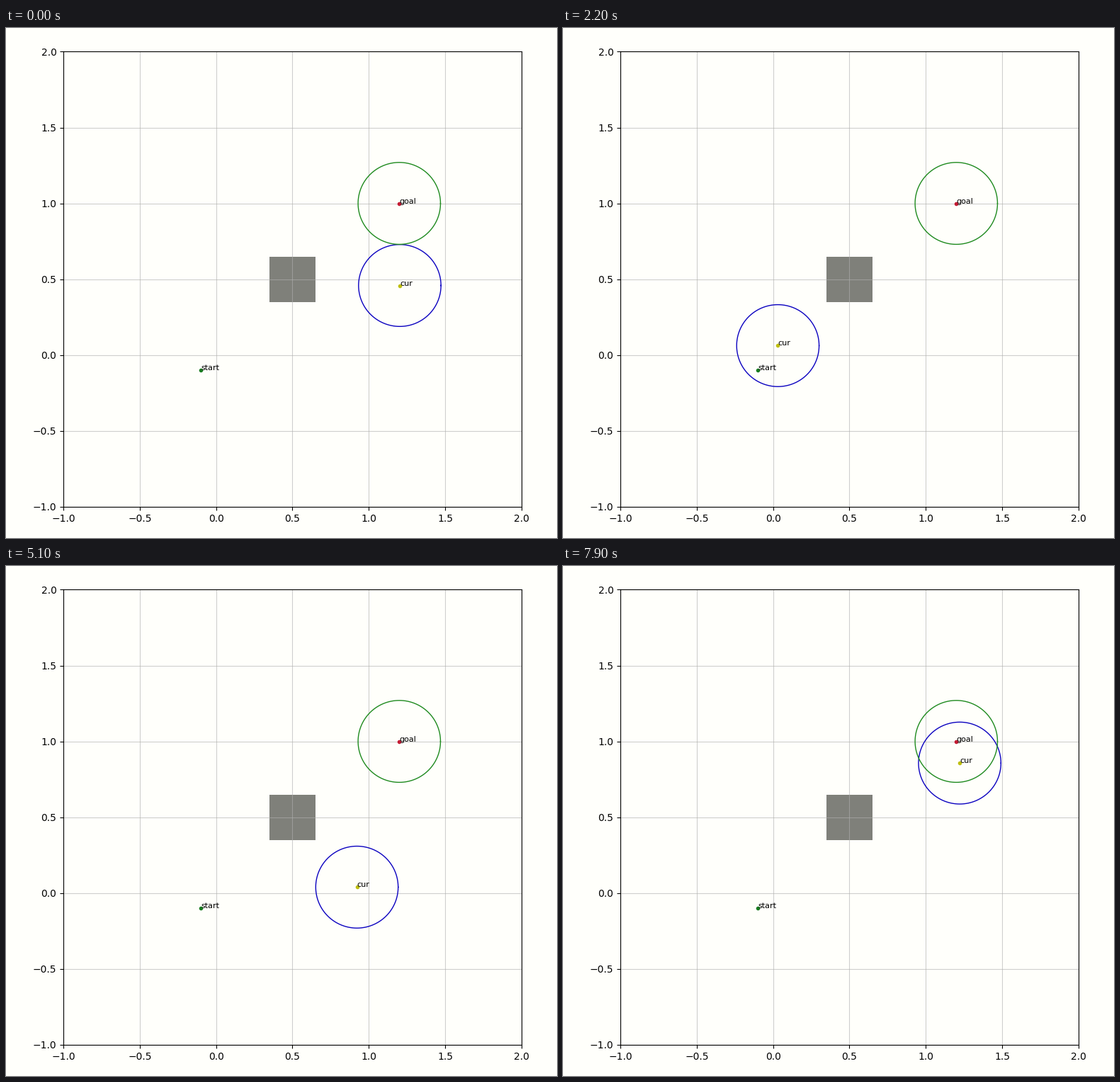
These frames come from a looping animation (778 by 720 pixels, 8 s). A matplotlib script:

```python
import numpy as np
import matplotlib.pyplot as plt
from matplotlib.animation import FuncAnimation
from matplotlib.patches import Rectangle

W, H, DPI = 778, 720, 100
LEFT, RIGHT, TOP, BOTTOM = 81.2, 727.7, 33.45, 675.9
FRAMES, STEP = 80, 100
RADIUS = 0.27
PAPER = "#fffffb"
START, GOAL = (-0.1, -0.1), (1.2, 1.0)

# The loop opens late in one run; a new run leaves START at step RESTART.
RESTART = 16
LEAD, END_SPEED, SPEED = 1.654, 0.0345, 0.0326

# The robot dips under the obstacle, then curves up towards the goal.
bends = np.array([START, (0.066, 0.07), (0.196, 0.029), (0.456, -0.072),
                  (0.708, -0.06), (0.935, 0.048), (1.16, 0.328),
                  (1.228, 0.629), (1.204, 0.963)])
knots = np.append(0, np.cumsum(np.hypot(*np.diff(bends, axis=0).T)))
slopes = np.gradient(bends, knots, axis=0, edge_order=2)


def position(i):
    """Point on the smooth path after travelling at even speed."""
    s = LEAD + END_SPEED * i if i < RESTART else SPEED * (i - RESTART)
    s = min(s, knots[-1])
    k = min(np.searchsorted(knots, s, side="right") - 1, len(knots) - 2)
    h = knots[k + 1] - knots[k]
    u = (s - knots[k]) / h
    return ((1 + 2 * u) * (1 - u) ** 2 * bends[k]
            + u * (1 - u) ** 2 * h * slopes[k]
            + u * u * (3 - 2 * u) * bends[k + 1]
            + u * u * (u - 1) * h * slopes[k + 1])


angle = np.linspace(0, 2 * np.pi, 121)
ring_x, ring_y = RADIUS * np.cos(angle), RADIUS * np.sin(angle)

fig = plt.figure(figsize=(W / DPI, H / DPI), dpi=DPI, facecolor=PAPER)
ax = fig.add_axes([LEFT / W, 1 - BOTTOM / H,
                   (RIGHT - LEFT) / W, (BOTTOM - TOP) / H], facecolor=PAPER)
ticks = np.arange(-1, 2.1, 0.5)
ax.set(xlim=(-1, 2), ylim=(-1, 2), xticks=ticks, yticks=ticks)
ax.grid(color="#b0b0b0", alpha=0.6, linewidth=0.8)
ax.add_patch(Rectangle((0.35, 0.35), 0.3, 0.3, color="#7f807a", linewidth=0))


def add_point(pos, color, name):
    dot, = ax.plot(*pos, ".", color=color)
    return dot, ax.text(*pos, name, fontsize=8)


def add_ring(pos, color):
    return ax.plot(pos[0] + ring_x, pos[1] + ring_y, color=color, linewidth=1)[0]


add_point(START, "#1a7d22", "start")
add_point(GOAL, "#c41c34", "goal")
cur_dot, cur_label = add_point(START, "#bfbf10", "cur")
cur_ring = add_ring(START, "#0a00c0")
add_ring(GOAL, "#1e8a1e")


def draw(i):
    x, y = position(i)
    cur_dot.set_data([x], [y])
    cur_label.set_position((x, y))
    cur_ring.set_data(x + ring_x, y + ring_y)
    return cur_dot, cur_label, cur_ring


anim = FuncAnimation(fig, draw, frames=FRAMES, interval=STEP,
                     repeat=True, repeat_delay=0)
plt.show()
```
